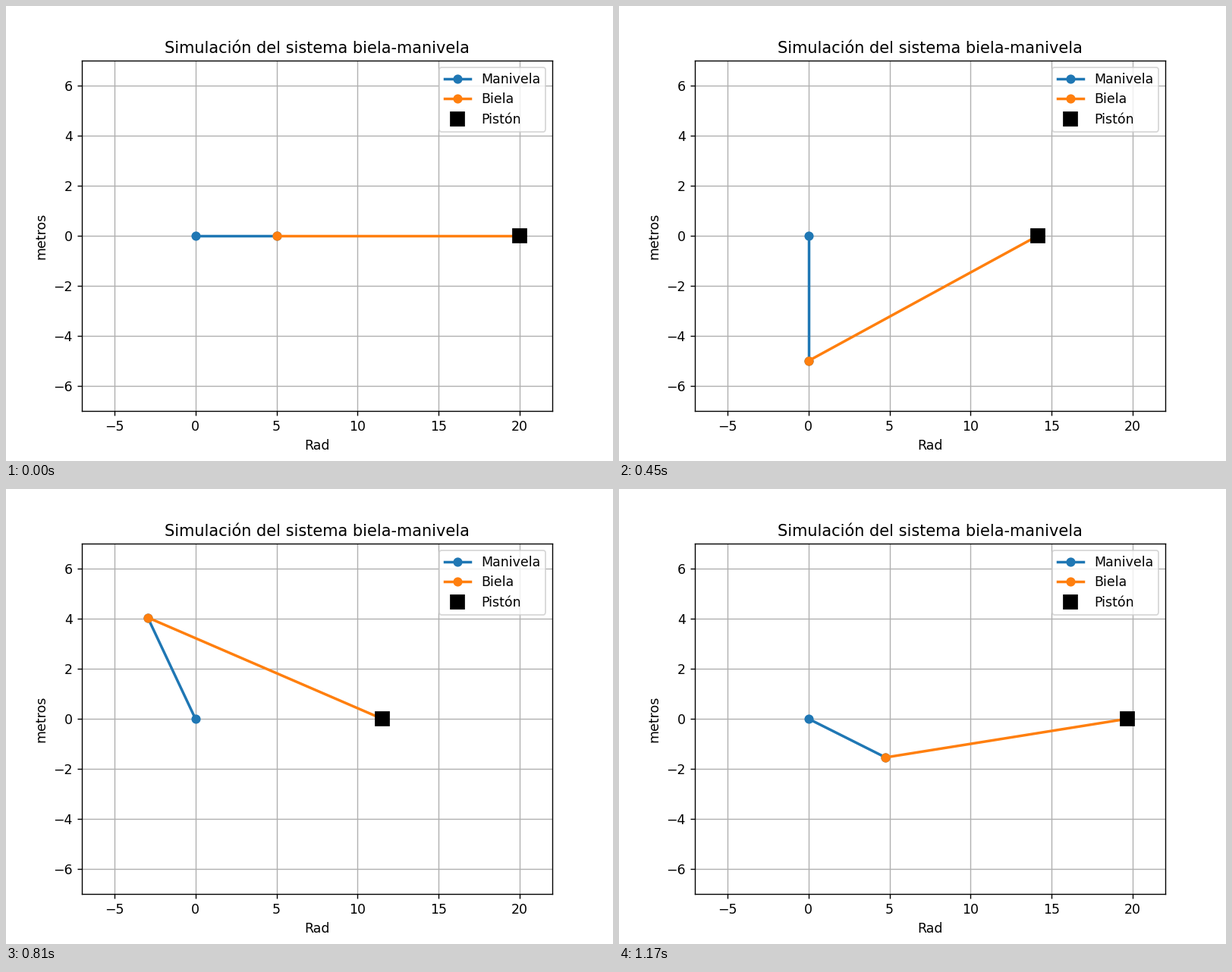
A matplotlib script for the animation above (1200 ms loop, 800 by 600 pixels).

```python
import numpy as np
import matplotlib.pyplot as plt
from matplotlib.animation import FuncAnimation

plt.rcParams["font.family"] = "DejaVu Sans"

CRANK = 5
ROD = 15
STEPS_PER_TURN = 20
TURNS = 2
INTERVAL = 30

fig, ax = plt.subplots(figsize=(6.4, 4.8), dpi=125)
ax.set_xlim(-7, 22)
ax.set_ylim(-7, 7)
ax.set_title("Simulación del sistema biela-manivela")
ax.set_xlabel("Rad")
ax.set_ylabel("metros")
ax.grid(True)

crank, = ax.plot([], [], "o-", lw=2, color="tab:blue", label="Manivela")
rod, = ax.plot([], [], "o-", lw=2, color="tab:orange", label="Biela")
piston, = ax.plot([], [], "ks", markersize=10, label="Pistón")
ax.legend(loc="upper right")


def update(frame):
    angle = 2 * np.pi * frame / STEPS_PER_TURN
    x, y = CRANK * np.cos(angle), CRANK * np.sin(angle)
    slide = x + np.sqrt(ROD**2 - y**2)
    crank.set_data([0, x], [0, y])
    rod.set_data([x, slide], [y, 0])
    piston.set_data([slide], [0])
    return crank, rod, piston


anim = FuncAnimation(fig, update, frames=STEPS_PER_TURN * TURNS,
                     interval=INTERVAL, repeat=True, repeat_delay=0)

plt.show()
```
